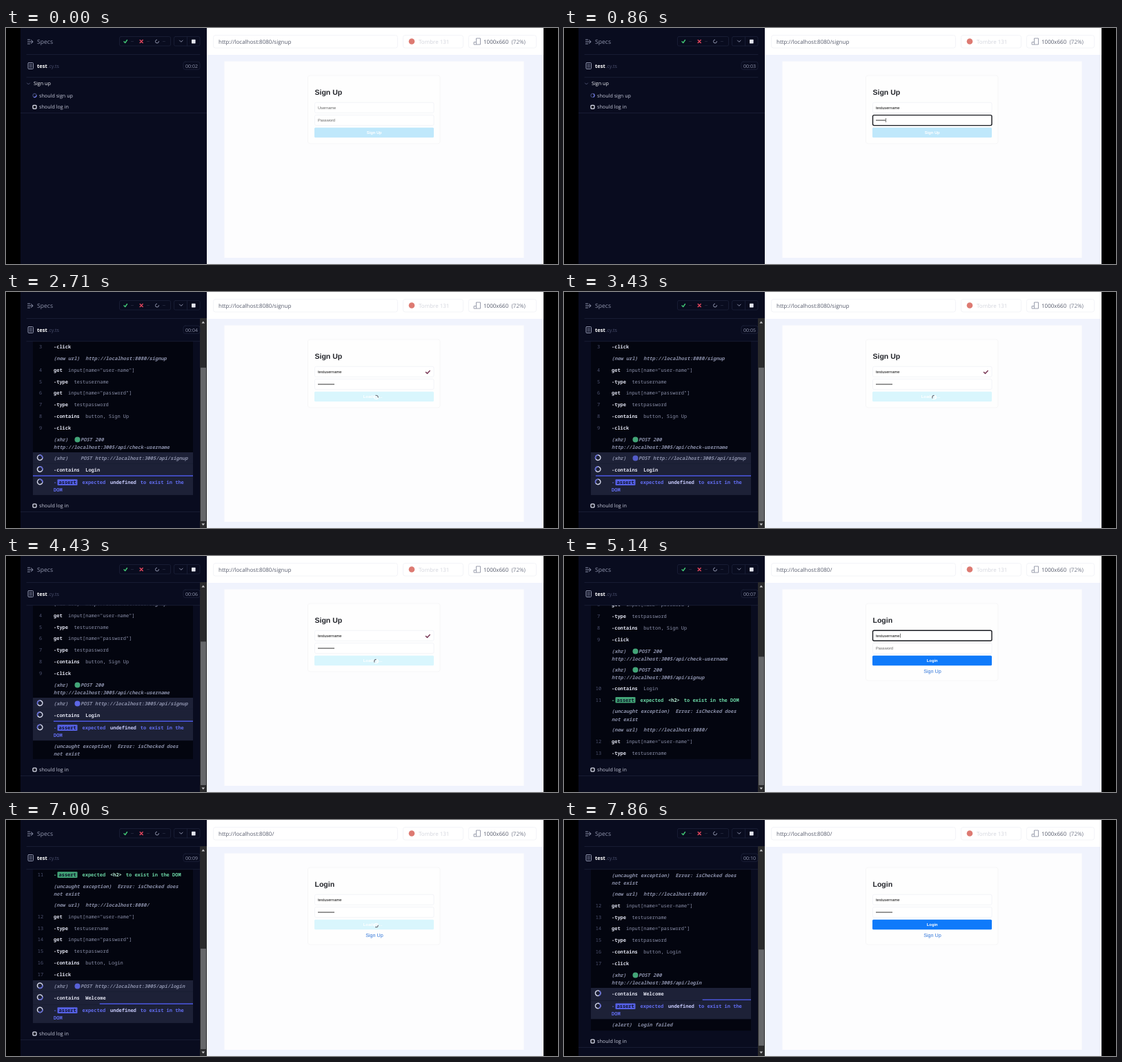
An HTML page that plays this animation: 800 by 343 pixels, repeating every 8 s.

```html
<!DOCTYPE html>
<html lang="en">
<head>
<meta charset="utf-8">
<title>Test runner</title>
<style>
  html, body { margin: 0; width: 100%; height: 100%; overflow: hidden; background: #000; }
  svg { display: block; width: 100vw; height: 100vh; text-rendering: geometricPrecision; }
  .ui { font-family: "Open Sans", sans-serif; }
  .app { font-family: "Liberation Sans", Arial, sans-serif; }
  .mono { font: 500 7px "Noto Sans Mono", monospace; fill: #8b90aa; }
  .b { font-weight: 700; }
  .name { font-weight: 700; fill: #dfe1ee; }
  .event { font-style: italic; font-weight: 600; }
  .num { font-weight: 400; fill: #4d5270; text-anchor: middle; }
  .line { fill: none; stroke-linecap: round; stroke-linejoin: round; }
</style>
</head>
<body>
<svg viewBox="0 0 800 343" preserveAspectRatio="none">
  <defs><clipPath id="pane"><rect x="21" y="71.5" width="270" height="272"/></clipPath></defs>
  <rect width="800" height="343"/>
  <rect x="21" width="270" height="343" fill="#090c1f"/>
  <g id="log" clip-path="url(#pane)"></g>
  <g id="bar"></g>

  <g class="ui line" stroke="#1c2139" stroke-width=".8">
    <path d="M30 38.5H281M30 71.7H281"/>
    <rect x="164.500" y="12.500" width="74" height="13.500" rx="2"/>
    <rect x="243.500" y="12.500" width="37.500" height="13.500" rx="2"/>
    <path d="M262.500 12.500v13.500"/>
    <rect x="257" y="49" width="24" height="11.500" rx="3"/>
  </g>
  <g class="line" stroke="#8f94ad">
    <path d="M31.500 17h3M31.500 20h7M31.500 23h3M36.500 17.500l2.700 2.500-2.700 2.500"/>
    <rect x="32" y="50.500" width="7.500" height="9" rx="1"/>
    <path d="M34 53h3.500M34 55h3.500M34 57h3.500" stroke-width=".8"/>
    <path d="M251.500 18l2.300 2.300 2.300-2.300"/>
    <circle cx="219" cy="19.500" r="2.500" stroke-dasharray="11 5"/>
    <path d="M171 19.700l1.700 1.800 2.800-4" stroke="#3fbf72" stroke-width="1.500"/>
    <path d="M194.200 17.500l4 4m0-4l-4 4" stroke="#e0455c" stroke-width="1.500"/>
  </g>
  <rect x="269" y="16.800" width="5.600" height="5.600" rx=".6" fill="#e4e6f0"/>
  <g class="ui" fill="#9095ad">
    <text x="45" y="23.300" font-size="8.600">Specs</text>
    <g font-size="6" fill="#555a75"><text x="181" y="21.300">--</text><text x="204" y="21.300">--</text><text x="227" y="21.300">--</text></g>
    <text x="45" y="57.700" font-size="7.500" class="b" fill="#fff">test</text>
    <text x="60.500" y="57.700" font-size="7.200" fill="#4c5170">.cy.ts</text>
    <text id="clock" x="269" y="57.500" font-size="7" text-anchor="middle"></text>
  </g>

  <rect x="291" width="488" height="343" fill="#f0f3fd"/>
  <rect x="291" width="488" height="39" fill="#fff"/>
  <g class="line" stroke="#f3f4f8">
    <rect x="300.500" y="10.500" width="267" height="18.500" rx="3"/>
    <rect x="575.500" y="10.500" width="87" height="18.500" rx="3"/>
    <rect x="670.500" y="10.500" width="98" height="18.500" rx="3"/>
  </g>
  <g class="ui" font-size="8" fill="#555a6b">
    <text id="url" x="308" y="22.700"></text>
    <circle cx="588" cy="19.500" r="4.300" fill="#dd7a72"/>
    <text x="598" y="22.700" fill="#d3d5dd">Tombre 131</text>
    <path class="line" d="M678.500 20.500h3v-5.500h6v9h-9zM681.500 20.500v3" stroke="#9095a5" stroke-width=".9"/>
    <text x="692" y="22.700">1000x660</text>
    <text x="732.500" y="22.700" fill="#777c8c">(72%)</text>
  </g>
  <rect x="316.500" y="48.500" width="434" height="285.500" fill="#fdfdfe"/>
  <g id="app" class="app"></g>
</svg>
<script>
const LOOP = 8000, H1 = 16.85, H2 = 27, GAP = 11.2, BAR = 1.5, CH = 4.2;
const BOTTOM = 295.2, LEFT = 39, RIGHT = 271, TX = 69;
const START = 1290, CHECKED = 2290, SENT = 2430, LOGIN = 4710, SUBMIT = 5860, FAILED = 7780;
const $ = id => document.getElementById(id);
const clamp = (v, a = 0, b = 1) => Math.min(b, Math.max(a, v));
const text = (x, y, s, attrs = '') => `<text x="${x}" y="${y}" ${attrs}>${s}</text>`;
const rect = (x, y, w, h, attrs) => `<rect x="${x}" y="${y}" width="${w}" height="${h}" ${attrs}/>`;
const mono = (x, y, s, cls = '', fill = '') =>
  text(x, y + 2.4, s, `class="mono ${cls}"` + (fill && ` style="fill:${fill}"`));

function spinner(x, y, r, t, base, arc, w = 1.5) {
  const len = 2 * Math.PI * r;
  return `<g class="line" stroke-width="${w}" transform="translate(${x} ${y}) rotate(${t * .36 % 360})">` +
    `<circle r="${r}" stroke="${base}"/>` +
    `<circle r="${r}" stroke="${arc}" stroke-dasharray="${len * .3} ${len}"/></g>`;
}

// Each row gives its height and markup for a time.
function cmd(at, n, name, msg = '', done = at, barAt = at, rate = .023) {
  return { at, runs: t => t < done, height: t => H1 + (t < done ? BAR : 0),
    draw(y, t) {
      const on = t < done, c = y + H1 / 2;
      const label = `<tspan class="name">${name}</tspan>\u00a0\u00a0<tspan class="${on ? 'name' : ''}">${msg}</tspan>`;
      const x = LEFT + clamp((t - barAt) * rate, 0, RIGHT - LEFT);
      return (on ? rect(x, y + H1 - .3, RIGHT - x, 1.7, 'fill="#4a55d8"') : mono(50, c, n, 'num')) + mono(TX, c, label);
    } };
}

function event(at, ...lines) {
  return { at, runs: () => false, height: () => lines.length > 1 ? H2 : H1,
    draw: y => lines.map((s, i) => mono(TX, y + H1 / 2 + i * GAP, s, 'event')).join('') };
}

function xhr(at, done, path, waiting) {
  const url = 'http://localhost:3005/api/' + path;
  const lines = t => t < done ? waiting || ['POST ' + url] : ['POST 200', url];
  return { at, runs: t => t < done, height: t => lines(t).length > 1 ? H2 : H1,
    draw(y, t) {
      const c = y + H1 / 2, [a, b] = lines(t), on = t < done;
      const pulse = on ? clamp(.3 - .8 * Math.cos((t % 1300) / 1300 * 2 * Math.PI)) : 1;
      return mono(TX, c, '(xhr)', 'event') + mono(108, c, a, 'event') + (b ? mono(TX, c + GAP, b, 'event') : '') +
        `<circle cx="103.500" cy="${c}" r="4" fill="${on ? '#5f69ea' : '#43a578'}" opacity="${pulse}"/>`;
    } };
}

function check(at, done = Infinity, n = '') {
  return { at, runs: t => t < done, height: t => t < done ? H2 : H1,
    draw(y, t) {
      const on = t < done, c = y + H1 / 2, color = on ? '#626df0' : '#6bd6a5';
      const what = on ? 'undefined' : '&lt;h2&gt;', x = 157 + (on ? 9 : 4) * CH;
      return (on ? '' : mono(50, c, n, 'num')) + mono(TX, c, '-', 'b', color) +
        rect(74.5, c - 4.3, 29, 8.6, `rx="1" fill="${on ? '#5661e6' : '#43a578'}"`) +
        mono(76.5, c, 'assert', 'b', '#0b1026') + mono(110.5, c, 'expected', 'b', color) +
        mono(151, c, what, 'b', on ? '#c9ccff' : '#b9f2d8') +
        mono(x, c, on ? 'to exist in the' : 'to exist in the DOM', 'b', color) +
        (on ? mono(TX, c + GAP, 'DOM', 'b', color) : '');
    } };
}

const USER = 'input[name="user-name"]', PASS = 'input[name="password"]';
const rows = [
  cmd(START, 1, 'visit', 'http://localhost:8080'),
  cmd(START, 2, '-contains', 'Sign Up'),
  cmd(START, 3, '-click'),
  event(START, '(new url)\u00a0\u00a0http://localhost:8080/signup'),
  cmd(START, 4, 'get', USER),
  cmd(START, 5, '-type', 'testusername'),
  cmd(START, 6, 'get', PASS),
  cmd(START, 7, '-type', 'testpassword'),
  cmd(START, 8, '-contains', 'button, Sign Up'),
  cmd(START, 9, '-click', '', SENT, 570),
  xhr(START, CHECKED, 'check-username', ['POST http://localhost:3005/api/check-', 'username']),
  xhr(SENT, LOGIN, 'signup'),
  cmd(SENT, 10, '-contains', 'Login', LOGIN, 3130),
  check(2570, LOGIN, 11),
  event(4000, '(uncaught exception)\u00a0\u00a0Error: isChecked does', 'not exist'),
  event(LOGIN, '(new url)\u00a0\u00a0http://localhost:8080/'),
  cmd(4860, 12, 'get', USER),
  cmd(5000, 13, '-type', 'testusername'),
  cmd(5200, 14, 'get', PASS),
  cmd(5280, 15, '-type', 'testpassword'),
  cmd(5500, 16, '-contains', 'button, Login'),
  cmd(5570, 17, '-click', '', SUBMIT, 5710),
  xhr(SUBMIT, FAILED, 'login'),
  cmd(SUBMIT, 18, '-contains', 'Welcome', Infinity, 5720, .0755),
  check(SUBMIT),
  event(FAILED, '(alert)\u00a0\u00a0Login failed')
];

const chevron = (x, y) => `<path class="line" stroke="#555b7c" stroke-width=".9" d="M${x - 2} ${y - 1}l2 2 2-2"/>`;

function tests(signY, logY, t) {
  const ui = 'class="ui" font-size="7.200" fill="#c6c9da"';
  return spinner(41.5, signY, 2.6, t, '#3c4370', '#7681f2', 1.2) + text(48, signY + 2.6, 'should sign up', ui) +
    rect(39, logY - 2.4, 5, 5, 'rx="1" fill="none" stroke="#dfe1ee" stroke-width="1.300"') +
    text(48, logY + 2.6, 'should log in', ui) + rect(21, logY + 8.5, 270, .8, 'fill="#1c2139"');
}

function drawLog(t) {
  if (t < START) {
    $('bar').innerHTML = '';
    $('log').innerHTML = chevron(32.5, 81) + text(40, 83.4, 'Sign up', 'class="ui" font-size="7.200" fill="#f1f2f8"') +
      tests(98, 114.7, t);
    return;
  }
  const shown = rows.filter(r => t >= r.at);
  const height = shown.reduce((h, r) => h + r.height(t), 0);
  // The last row is still scrolling into view.
  const off = t < FAILED ? 0 : 27 - 16 * clamp((t - FAILED) / 80);
  const end = BOTTOM + off, top = end - height;
  let y = top;
  let out = chevron(42, top - 8) + text(49, top - 5.6, 'TEST BODY', 'class="ui" font-size="5.800" fill="#a5a9bf"') +
    rect(LEFT, top, RIGHT - LEFT, height, 'fill="#03050f"');
  for (const r of shown) {
    const h = r.height(t);
    if (r.runs(t)) {
      out += rect(LEFT, y, RIGHT - LEFT, h, 'fill="#1d2137"') +
        spinner(49.2, y + H1 / 2 - .7, 3.7, t, '#d5d8ea', '#5a63d8');
    }
    out += r.draw(y, t);
    y += h;
  }
  $('log').innerHTML = out + tests(top - 23.5, end + 15.3, t);

  const total = height + 132, thumb = 285 * 305 / total;
  $('bar').innerHTML = rect(281, 38, 10, 305, 'fill="#2a2a2c"') +
    rect(282, 333 - thumb - off * 285 / total, 8, thumb, 'fill="#66676a"') +
    '<path fill="#c8c8ca" d="M283.500 45.500l2.300-3 2.300 3zM283.500 336.500l2.300 3 2.300-3z"/>';
}

const typed = (s, t, a, b) => s.slice(0, Math.ceil(s.length * clamp((t - a) / (b - a))));
const between = (t, a, b) => t >= a && t < b;

function drawApp(t) {
  const login = t >= LOGIN, title = login ? 'Login' : 'Sign Up';
  const [u0, u1, p0, p1] = login ? [5000, 5140, 5280, 5420] : [280, 560, 700, 990];
  const user = typed('testusername', t, u0, u1), pass = typed('•'.repeat(12), t, p0, p1);
  const busy = between(t, SENT, LOGIN) || between(t, SUBMIT, FAILED);
  const ready = login || between(t, CHECKED, SENT);
  const focus = between(t, u0, p0) ? 0 : between(t, p0, login ? SUBMIT : SENT) ? 1 : -1;
  const field = (i, y, value, hint) => {
    const on = i === focus;
    const caret = on ? rect(452.3 + value.length * (i ? 2 : 2.92), y - 3, .6, 6, 'fill="#222"') : '';
    return rect(447.5, y - 7.4, 172.5, 15, `rx="2" fill="#fff" stroke="${on ? '#17191f' : '#f0f1f7'}" stroke-width="${on ? 1.4 : .8}"`) +
      text(452, y + 2, value || hint, `font-size="5.700" fill="${value ? '#111' : '#666'}"`) + caret;
  };
  let out = rect(437.5, 69, 191.5, login ? 112 : 99, 'rx="3" fill="#fefefe" stroke="#f5f5f7" stroke-width=".9"') +
    text(447.5, 97, title, 'class="b" font-size="10.500" fill="#22242a"') +
    field(0, 115.7, user, 'Username') + field(1, 134, pass, 'Password') +
    rect(447, 144.7, 173, 14.5, `rx="1.500" fill="${busy ? '#d9f6fd' : ready ? '#0f7afa' : '#bfe8fb'}"`) +
    text(busy ? 531.5 : 533.7, 154, busy ? 'Loading...' : title, 'class="b" font-size="5.800" fill="#fff" text-anchor="middle"');
  if (busy) out += spinner(536.5, 153, 2.8, t, '#ffffff', '#5c6470', 1.1);
  if (login) out += text(534, 169.7, 'Sign Up', 'font-size="7.200" fill="#2f74d8" text-anchor="middle"');
  else if (t >= CHECKED) out += '<path class="line" d="M608.500 116.500l2 2 3.700-4" stroke="#7d3f5c" stroke-width="1.600"/>';
  else if (t >= START) out += spinner(611.5, 116, 3.5, t, '#d4d5da', '#2b2d33', 1.1);
  $('app').innerHTML = out;
  $('url').textContent = 'http://localhost:8080/' + (login ? '' : 'signup');
}

function render(now) {
  const t = now % LOOP;
  $('clock').textContent = '00:' + String(Math.floor(t / 1000 + 2.2)).padStart(2, '0');
  drawLog(t);
  drawApp(t);
}

const begin = performance.now();
function frame() {
  render(performance.now() - begin);
  requestAnimationFrame(frame);
}
frame();
</script>
</body>
</html>
```
